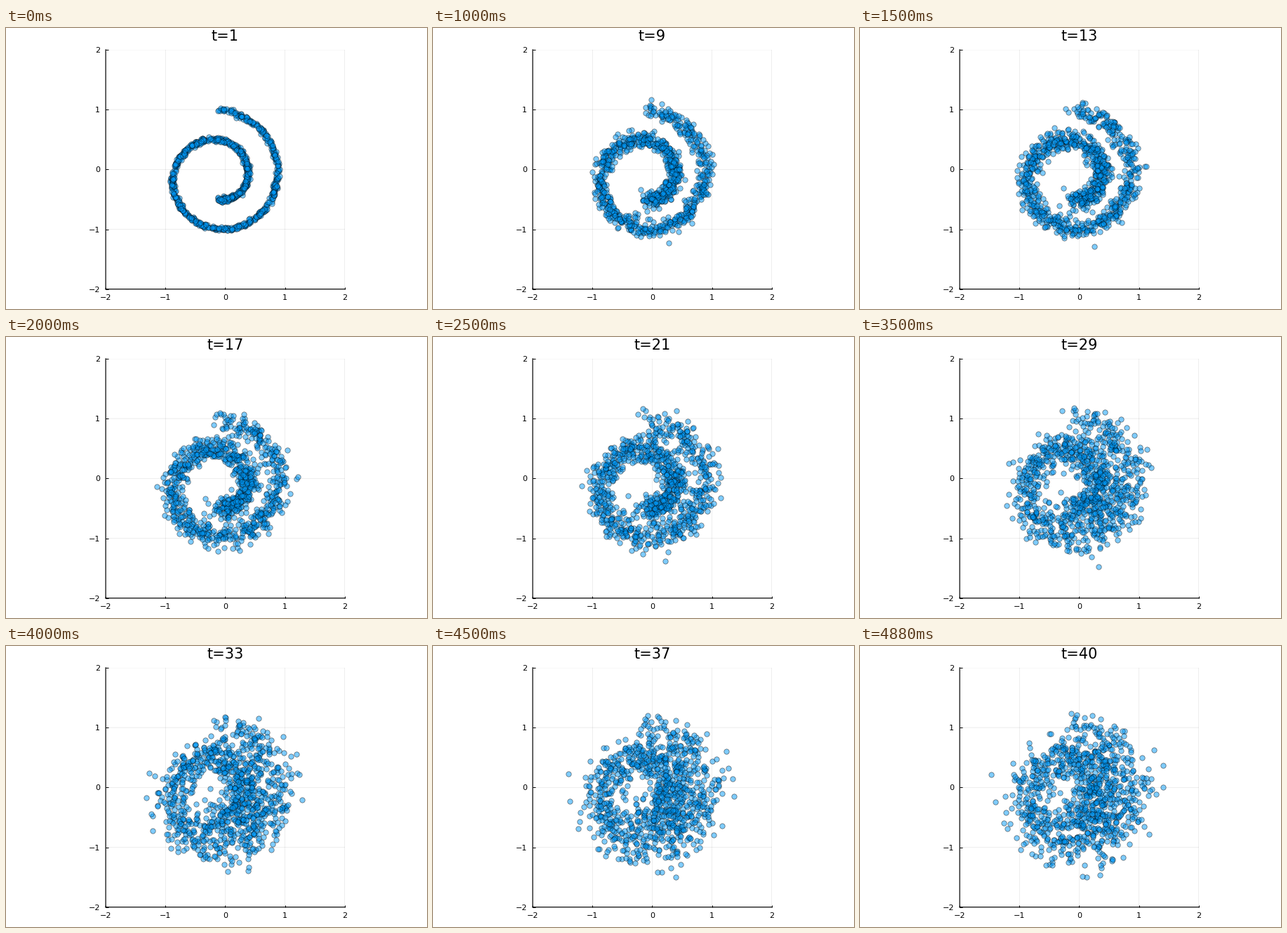
These frames come from a looping animation (600x400 px, 6.26 s). A matplotlib script:

```python
import matplotlib.pyplot as plt
import numpy as np
from matplotlib.animation import FuncAnimation

W, H, DPI = 600, 400, 100
LEFT, RIGHT, TOP, BOTTOM = 142.1, 482.7, 30.9, 371.7
N_POINTS, N_STEPS = 1000, 40
STEP_MS, TICK_MS, LOOP_MS = 125, 20, 6260
PX = 72 / DPI

plt.rcParams["font.family"] = "DejaVu Sans"


def swiss_roll(rng):
    angle = 1.5 * np.pi * (1 + 2 * rng.random(N_POINTS))
    roll = np.column_stack([angle * np.cos(angle), angle * np.sin(angle)])
    return (roll - [1.56, 1.55]) / 12.59


def diffuse(points, rng):
    """Forward diffusion with a linearly growing noise variance."""
    path = []
    for step in range(1, N_STEPS + 1):
        beta = 0.0003 + 0.000038 * step
        noise = rng.standard_normal(points.shape)
        points = np.sqrt(1 - beta) * points + np.sqrt(beta) * noise
        path.append(points)
    return path


rng = np.random.default_rng(7)
path = diffuse(swiss_roll(rng), rng)

fig = plt.figure(figsize=(W / DPI, H / DPI), dpi=DPI, facecolor="white")
ax = fig.add_axes([LEFT / W, 1 - BOTTOM / H, (RIGHT - LEFT) / W, (BOTTOM - TOP) / H])
ax.set(xlim=(-2, 2), ylim=(-2, 2), xticks=range(-2, 3), yticks=range(-2, 3))
ax.set_axisbelow(True)
ax.grid(color="black", alpha=0.1, linewidth=0.7 * PX)
ax.tick_params(direction="in", length=3.5 * PX, width=1 * PX,
               labelbottom=False, labelleft=False)
for side in ("top", "right"):
    ax.spines[side].set_visible(False)
for side in ("left", "bottom"):
    ax.spines[side].set_linewidth(1.2 * PX)

# Antialiased lines stay at their true sub-pixel positions.
for line in [*ax.get_xgridlines(), *ax.get_ygridlines(), *ax.spines.values()]:
    line.set_snap(False)


def label(x, y, text, size, align="center"):
    return fig.text(x / W, 1 - y / H, text, fontsize=size, ha=align, va="baseline")


for value in range(-2, 3):
    text = str(value).replace("-", "\u2212")
    share = (value + 2) / 4
    label(LEFT + share * (RIGHT - LEFT), 387, text, 8)
    label(134, BOTTOM - share * (BOTTOM - TOP) + 4.2, text, 8, "right")

title = label((LEFT + RIGHT) / 2, 18, "t=1", 15)
dots, = ax.plot([], [], "o", markersize=7.4 * PX, markeredgewidth=0.8 * PX,
                markerfacecolor=(0, 0.605, 0.979, 0.5),
                markeredgecolor=(0, 0, 0, 0.5), clip_on=False, zorder=3)


def draw(frame):
    step = min(frame * TICK_MS // STEP_MS, N_STEPS - 1)
    dots.set_data(*path[step].T)
    title.set_text(f"t={step + 1}")
    return dots, title


anim = FuncAnimation(fig, draw, frames=LOOP_MS // TICK_MS, interval=TICK_MS,
                     repeat=True, repeat_delay=0, blit=False)
plt.show()
```
